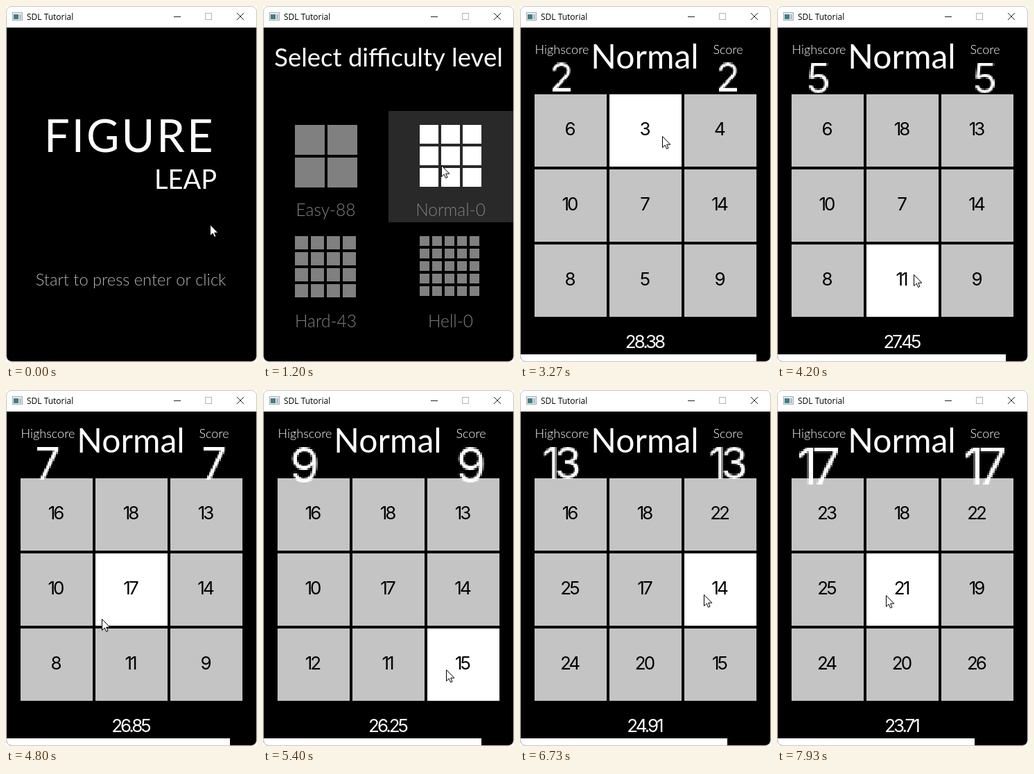
Animation, 362 px wide and 512 px high, one loop 8000 ms. Source, as an HTML page with a canvas:

```html
<!DOCTYPE html>
<html lang="en">
<head>
<meta charset="utf-8">
<title>SDL Tutorial</title>
<style>
  html, body { margin: 0; width: 100%; height: 100%; overflow: hidden; background: #fff; }
  canvas { display: block; }
</style>
</head>
<body>
<canvas id="stage" width="362" height="512"></canvas>
<script>
const LOOP = 8000, FPS = 15, POP = 400;
const FIRST_CLICK = 2782, CLICK_GAP = 319.4;
const TILE = 104, PITCH = 108, BOARD_X = 21, BOARD_Y = 127;
const DISPLAY = 'Lato, sans-serif', DIGITS = 'Inter, sans-serif';

const ctx = document.getElementById('stage').getContext('2d');
const scoreCanvas = document.createElement('canvas');
scoreCanvas.width = 60;
scoreCanvas.height = 32;
const scoreCtx = scoreCanvas.getContext('2d');
const arrow = new Path2D('M.5 .5V16.6L4.2 13.1L6.6 18.5L9 17.4L6.7 12.2H11.8Z');

// Each clicked number gives way to the next one in this queue
const firstBoard = [6, 3, 4, 1, 7, 2, 8, 5, 9];
const queue = [10, 14, 18, 13, 11, 16, 17, 12, 15, 25, 20, 24, 22, 19, 26, 23, 21];
const levels = ['Easy-88', 'Normal-0', 'Hard-43', 'Hell-0'];

const clamp = (v, low = 0, high = 1) => Math.min(high, Math.max(low, v));
const smooth = p => p * p * (3 - 2 * p);
const cellOrigin = i => [BOARD_X + i % 3 * PITCH, BOARD_Y + Math.floor(i / 3) * PITCH];

// The board after a number of clicks: number k is clicked k-th
function boardAfter(clicks) {
  const board = [...firstBoard];
  for (let k = 1; k <= clicks; k++) board[board.indexOf(k)] = queue[k - 1];
  return board;
}

function planMoves() {
  const moves = [
    { start: 930, end: 1195, from: [294, 314], to: [257, 229], ease: smooth },
    { start: 1670, end: 2270, from: [257, 229], to: [89, 297], ease: smooth }
  ];
  for (let k = 2; k <= queue.length; k++) {
    const from = moves.at(-1).to;
    const [left, top] = cellOrigin(boardAfter(k - 1).indexOf(k));
    const center = left + TILE / 2;
    const to = [clamp(from[0], center - 24, center + 24), top + 60];
    const start = FIRST_CLICK + (k - 2) * CLICK_GAP;
    const travel = Math.min(CLICK_GAP, 1.1 * Math.hypot(to[0] - from[0], to[1] - from[1]));
    moves.push({ start, end: start + travel, from, to, ease: p => p ** 4 });
  }
  return moves;
}
const moves = planMoves();

function pointerAt(time) {
  const { start, end, from, to, ease } = moves.findLast(move => move.start <= time) || moves[0];
  const e = ease(clamp((time - start) / (end - start)));
  return from.map((v, i) => v + (to[i] - v) * e);
}

function box(x, y, w, h, color) {
  ctx.fillStyle = color;
  ctx.fillRect(x, y, w, h);
}

function text(str, x, y, size, options = {}, target = ctx) {
  const { color = '#fff', weight = 400, font = DISPLAY, align = 'center', spacing = 0 } = options;
  target.font = `${weight} ${size}px ${font}`;
  target.letterSpacing = spacing + 'px';
  target.textAlign = align;
  target.fillStyle = color;
  target.fillText(str, align === 'center' ? x + spacing / 2 : x, y);
}

function number(value, x, y, color, target) {
  text(String(value), x, y, 26, { color, font: DIGITS, spacing: -3 }, target);
}

function drawTitle() {
  text('FIGURE', 55, 210, 65, { align: 'left', spacing: 3 });
  text('LEAP', 304, 263, 38, { align: 'right' });
  text('Start to press enter or click', 180, 402, 23.7, { color: '#b4b4b4', weight: 300 });
}

function drawMenu() {
  text('Select difficulty level', 181, 87, 36.5);
  box(181, 151, 180, 160, '#292929');
  levels.forEach((label, i) => {
    const n = i + 2, size = Math.floor((90 - 4 * (n - 1)) / n);
    const left = 46 + i % 2 * 180, top = 171 + Math.floor(i / 2) * 160;
    for (let k = 0; k < n * n; k++) {
      const x = left + k % n * (size + 4), y = top + Math.floor(k / n) * (size + 4);
      box(x, y, size, size, i === 1 ? '#fff' : '#808080');
    }
    text(label, left + 44.5, top + 131, 24.5, { color: '#808080', weight: 300 });
  });
}

function drawScore(score, x, scale) {
  scoreCtx.clearRect(0, 0, 60, 32);
  number(score, 30, 21, '#fff', scoreCtx);
  ctx.imageSmoothingEnabled = false;
  ctx.drawImage(scoreCanvas, x - 30 * scale, 77, 60 * scale, 32 * scale);
}

function drawGame(time, [px, py]) {
  const score = Math.max(0, Math.floor((time - FIRST_CLICK) / CLICK_GAP) + 1);
  const sinceClick = score ? (time - FIRST_CLICK) % CLICK_GAP : POP;
  const scale = 3 - 2 * clamp(sinceClick / POP);
  const seconds = Math.min(30, 31.6465 - time / 1000);

  text('Highscore', 60.5, 69, 18, { weight: 300 });
  text('Normal', 180, 90, 48);
  text('Score', 300, 69, 18, { weight: 300 });
  boardAfter(score).forEach((value, i) => {
    const [x, y] = cellOrigin(i);
    const hover = px >= x && px < x + TILE && py >= y && py < y + TILE;
    box(x, y, TILE, TILE, hover ? '#fff' : '#c4c4c4');
    number(value, x + 51.5, y + 59, '#000');
  });
  drawScore(score, 60, scale);
  drawScore(score, 300, scale);
  number(seconds.toFixed(2), 181, 492, '#fff');
  box(1, 501, Math.floor(seconds * 12), 10, '#fff');
}

function drawTitleBar() {
  box(1, 1, 360, 30, '#fff');
  box(9, 9, 15, 12, '#a5abb0');
  box(10, 10, 13, 10, '#e9edef');
  box(11, 12, 7, 7, '#3c7f87');
  box(19, 12, 3, 7, '#b5bec3');
  text('SDL Tutorial', 30, 20, 12, { color: '#000', font: '"Open Sans", sans-serif', align: 'left' });
  box(242, 15, 10, 1, '#222');
  ctx.lineWidth = 1;
  ctx.strokeStyle = '#b4b4b4';
  ctx.strokeRect(287.5, 10.5, 9, 9);
  ctx.strokeStyle = '#222';
  ctx.stroke(new Path2D('M333 10L343 20M343 10L333 20'));
}

function drawPointer([x, y]) {
  ctx.save();
  ctx.translate(Math.round(x), Math.round(y));
  ctx.fillStyle = '#fff';
  ctx.strokeStyle = '#000';
  ctx.fill(arrow);
  ctx.stroke(arrow);
  ctx.restore();
}

function scene(alpha, draw) {
  if (alpha <= 0) return;
  ctx.globalAlpha = alpha;
  draw();
  ctx.globalAlpha = 1;
}

function render(now) {
  // The picture advances in steps of 1/15 s
  const time = Math.floor((now % LOOP + 5) * FPS / 1000) * 1000 / FPS;
  const pointer = pointerAt(time);
  const menuIn = clamp((time - 67) / 533), gameIn = clamp((time - 1600) / 533);

  box(0, 0, 362, 512, '#fff');
  ctx.save();
  ctx.beginPath();
  ctx.roundRect(1, 1, 360, 510, 7);
  ctx.clip();
  box(1, 31, 360, 480, '#000');
  scene(1 - menuIn, drawTitle);
  scene(menuIn * (1 - gameIn), drawMenu);
  scene(gameIn, () => drawGame(time, pointer));
  drawTitleBar();
  drawPointer(pointer);
  ctx.restore();
  ctx.strokeStyle = '#c6c6c6';
  ctx.beginPath();
  ctx.roundRect(0.5, 0.5, 361, 511, 7.5);
  ctx.stroke();
}

const start = performance.now();
function tick() {
  render(performance.now() - start);
  requestAnimationFrame(tick);
}
tick();
</script>
</body>
</html>
```
